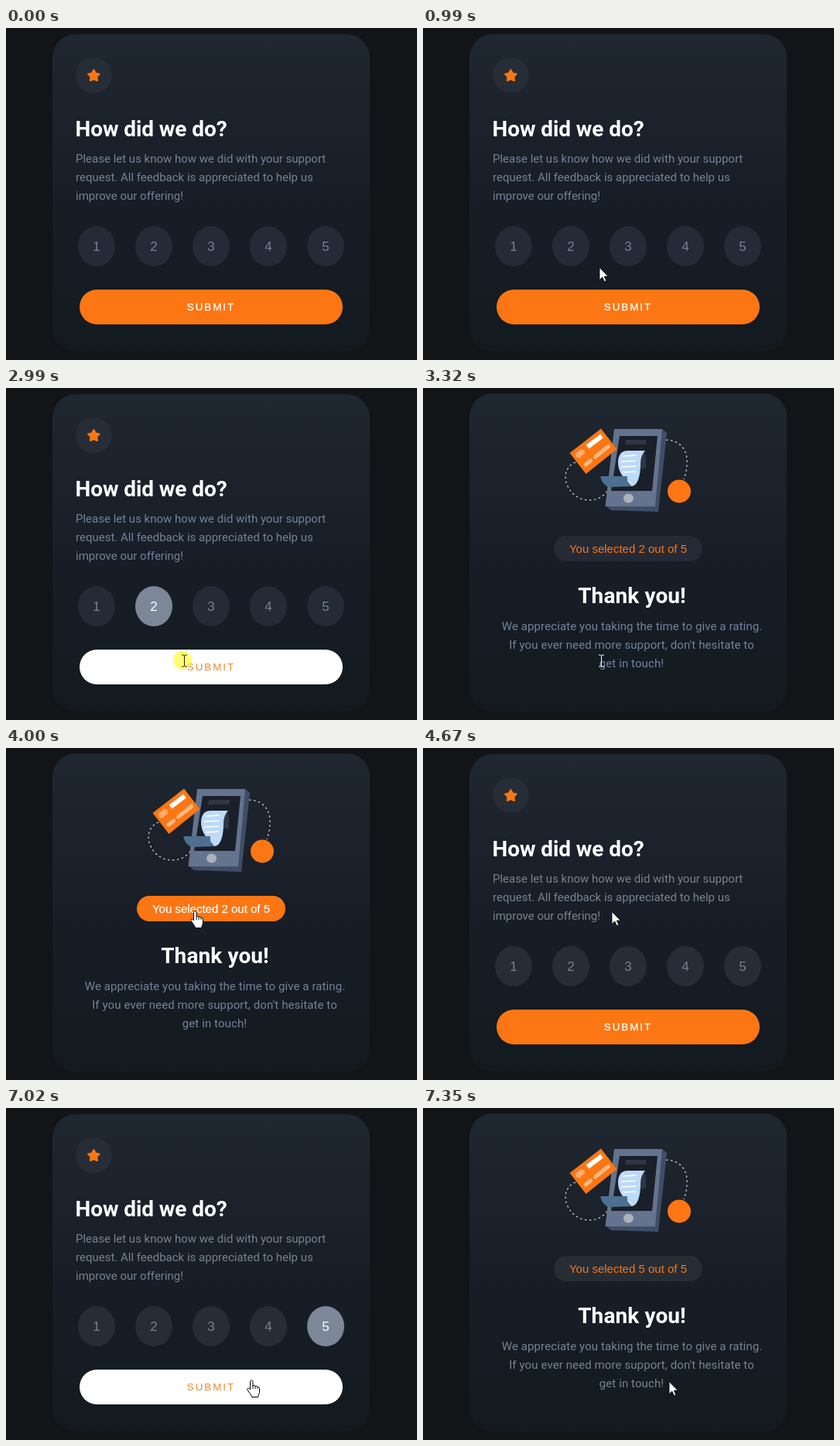
An HTML page for the animation above (8 s loop, 531x429 px).

```html
<!DOCTYPE html>
<html lang="en">
<head>
<meta charset="utf-8">
<title>Rating card</title>
<style>
  html, body { margin: 0; width: 100%; height: 100%; overflow: hidden; background: #121417; }
  svg { display: block; width: 531px; height: 429px; }
  .early { --chip: #252a36; --muted: #72839b; }
  .late { --chip: #262d35; --muted: #768392; }
  text { font-family: Roboto, sans-serif; }
  .title { font-size: 28px; font-weight: 700; fill: #fff; }
  .body { font-size: 15px; fill: var(--muted); }
  .ui { font-family: "Liberation Sans", Arial, sans-serif; }
  .mid { text-anchor: middle; }
  .chip { fill: var(--chip); }
  .num { font-size: 17px; fill: var(--muted); }
  .hover .chip { fill: #fc7614; }
  .picked .chip { fill: #7c8798; }
  .hover .num, .picked .num { fill: #fff; }
  #submit rect { fill: #fc7614; }
  #submit text { font-size: 13.333px; letter-spacing: 2px; fill: #fff; stroke: #fff; stroke-width: .3px; }
  #submit.hover rect { fill: #fff; }
  #submit.hover text { fill: #f0872b; stroke: none; }
  #badge text { font-size: 15px; fill: #fc7614; }
  #badge.hover text { fill: #fff; stroke: #fff; stroke-width: .25px; }
  #thanks .body { letter-spacing: .1px; }
  #thanks .title { letter-spacing: .1px; }
</style>
</head>
<body>
<svg id="stage" viewBox="0 0 531 429">
  <defs>
    <linearGradient id="night" x1="0" y1="0" x2="0" y2="1">
      <stop offset="0" stop-color="#1f2730"/>
      <stop offset=".5" stop-color="#181e27"/>
      <stop offset="1" stop-color="#121a1f"/>
    </linearGradient>
  </defs>

  <g id="ask">
    <rect x="60" y="8" width="410" height="410" rx="30" fill="url(#night)"/>
    <ellipse cx="113.5" cy="61" rx="23.5" ry="23" fill="#262d37"/>
    <polygon id="star" fill="#fc7614" stroke="#fc7614" stroke-width="2" stroke-linejoin="round"/>
    <text class="title" x="89.5" y="139.5" letter-spacing="-.1">How did we do?</text>
    <text class="body" x="90" y="174">Please let us know how we did with your support</text>
    <text class="body" x="90" y="198">request. All feedback is appreciated to help us</text>
    <text class="body" x="90" y="222">improve our offering!</text>
    <g id="numbers"></g>
    <g id="submit">
      <rect x="95" y="338" width="340" height="45" rx="22.5"/>
      <text class="ui mid" x="265" y="365">SUBMIT</text>
    </g>
  </g>

  <g id="thanks">
    <rect x="60" y="7" width="410" height="412" rx="30" fill="url(#night)"/>
    <g fill="none" stroke="#e8ecf2" stroke-width="1.1" stroke-dasharray="2.5 3.5">
      <path d="M314 67C334 68 342 82 341 97C341 106 339 112 337 118"/>
      <path d="M197 96C184 101 181 116 187 127C194 143 213 149 228 142C234 139 238 134 241 129"/>
    </g>
    <path fill="#3f4d66" d="M248 53H309L315 58L304 160L243 158L236 152Z"/>
    <path fill="#64738e" d="M247 53H309L300 153H235.500Z"/>
    <path fill="#1a202a" d="M254 62H303L296 133H243Z"/>
    <path fill="#2d3645" d="M262 67H289L288 73H261ZM278 81Q288 79 288 91V104H278Z"/>
    <path fill="#abb1bd" d="M259 142.500A6.500 6 0 0 1 272 142.500A6.500 6 0 0 1 259 142.500Z"/>
    <path fill="#bddaf8" d="M257 83Q260 81 264 81H287Q281 87 281 98C281 112 278 127 269 127L258 114Q252 106 252 96Q252 87 257 83Z"/>
    <path fill="#4f6f90" d="M229 114H264Q263 126 270 127L242 128Q232 127 229 114Z"/>
    <path fill="none" stroke="#fff" stroke-width="1.300" d="M258 88L276 87M256 95L275 94M256 102L275 101M258 109L275 108"/>
    <path fill="#fc7614" d="M189.500 84L230 52.500L250.500 79L210.500 111Z"/>
    <path stroke="#fff" stroke-width="6" d="M212.500 76L231 62"/>
    <g stroke="#ffb984" stroke-width="5" stroke-linecap="round">
      <path d="M210 99L216.500 94M222.500 89L239.500 75.500"/>
    </g>
    <g fill="#ffb984" fill-opacity=".75">
      <circle cx="201" cy="86.500" r="4"/>
      <circle cx="205" cy="83" r="4"/>
    </g>
    <circle cx="331" cy="133.500" r="15" fill="#fc7614"/>
    <g id="badge">
      <rect class="chip" x="169" y="191" width="192" height="33" rx="16.5"/>
      <text id="result" class="ui mid" x="265" y="213"></text>
    </g>
    <text class="title mid" x="270" y="278">Thank you!</text>
    <text class="body mid" x="270" y="313">We appreciate you taking the time to give a rating.</text>
    <text class="body mid" x="269.500" y="337">If you ever need more support, don't hesitate to</text>
    <text class="body mid" x="269.500" y="361">get in touch!</text>
  </g>

  <circle id="click" cx="228" cy="351.500" r="12" fill="#ff0" fill-opacity=".55"/>
  <g id="cursor" stroke-linejoin="round">
    <path id="arrow" fill="#fff" stroke="#000" stroke-width=".8" d="M0 .5V16.500L3.800 13L6.300 18.700L8.800 17.600L6.300 12H11.300Z"/>
    <g id="hand" transform="translate(-7 -2)" stroke="#000">
      <path fill="#fff" d="M4.500 2.500C4.500 .2 8 .2 8 2.500V8C9.500 7 11 7.500 11 8.600C12.300 7.800 13.800 8.400 14 9.600C15.200 9 16.500 9.800 16.500 11.200V16C16.500 18 14.800 19.500 14.800 22.500H6.500C6.200 19.500 3.500 17.500 1 13.200C0 11.200 2.400 10 4.500 12.800Z"/>
      <path fill="none" stroke-width=".9" d="M8 8V12M11 8.600V12M14 9.600V12"/>
    </g>
    <path id="beam" fill="none" stroke="currentColor" d="M-3.500 -7.500H-1L0 -6.500L1 -7.500H3.500M0 -6.500V6.500M-3.500 7.500H-1L0 6.500L1 7.500H3.500"/>
  </g>
</svg>
<script>
const LOOP = 8000;
const $ = id => document.getElementById(id);

$('star').setAttribute('points', Array.from({ length: 10 }, (_, i) => {
  const radius = i % 2 ? 4.2 : 7.7, angle = (i * 36 - 90) * Math.PI / 180;
  return [113.4 + radius * Math.cos(angle), 61.8 + radius * Math.sin(angle)].map(v => v.toFixed(2));
}).join(' '));

$('numbers').innerHTML = [1, 2, 3, 4, 5].map(n => {
  const x = 43 + 74 * n;
  return `<g id="n${n}"><ellipse class="chip" cx="${x}" cy="282" rx="24" ry="26"/>
    <text class="ui num mid" x="${x}" y="287.5">${n}</text></g>`;
}).join('');

// start, page, hovered part, picked part, cursor, x, y, rating
const steps = [
  [0, 'ask'],
  [660, 'ask', '', '', 'arrow', 376, 384],
  [990, 'ask', '', '', 'arrow', 228, 309],
  [1320, 'ask', 'n2', '', 'arrow', 201, 287],
  [1990, 'ask', 'n2', '', 'hand', 201, 287],
  [2660, 'ask', 'submit', 'n2', 'hand', 229, 351],
  [2990, 'ask', 'submit', 'n2', 'beam', 230.5, 352.5],
  [3320, 'thanks', '', '', 'beam', 230.5, 352.5, 2],
  [3660, 'thanks', 'badge', '', 'hand', 236, 222, 2],
  [4000, 'thanks', 'badge', '', 'hand', 245, 212, 2],
  [4670, 'ask', '', '', 'arrow', 244, 211],
  [5340, 'ask', '', '', 'arrow', 319, 292],
  [5680, 'ask', '', '', 'arrow', 387, 290],
  [6010, 'ask', 'n5', '', 'hand', 398, 287],
  [6350, 'ask', 'n5', '', 'beam', 398.5, 296.5],
  [6680, 'ask', '', '', 'arrow', 361, 326],
  [7020, 'ask', 'submit', 'n5', 'hand', 318, 353],
  [7350, 'thanks', '', '', 'arrow', 318, 353, 5]
];
const parts = ['n1', 'n2', 'n3', 'n4', 'n5', 'submit', 'badge'];
const show = (id, on) => { $(id).style.display = on ? '' : 'none'; };

function render(step) {
  const [start, page, hovered, picked, cursor, x = 0, y = 0, rating] = step;
  for (const id of ['ask', 'thanks']) show(id, id === page);
  for (const id of ['arrow', 'hand', 'beam']) show(id, id === cursor);
  for (const id of parts) {
    $(id).classList.toggle('hover', id === hovered);
    $(id).classList.toggle('picked', id === picked);
  }
  const clicking = hovered === 'submit' && cursor === 'beam';
  show('click', clicking);
  $('cursor').style.color = clicking ? '#222' : '#fff';
  $('cursor').setAttribute('transform', `translate(${x} ${y})`);
  $('result').textContent = rating ? `You selected ${rating} out of 5` : '';
  $('stage').setAttribute('class', start < 4670 ? 'early' : 'late');
}

let current;
function tick() {
  const time = performance.now() % LOOP;
  const step = steps.findLast(s => s[0] <= time);
  if (step !== current) render(current = step);
  requestAnimationFrame(tick);
}
tick();
</script>
</body>
</html>
```
